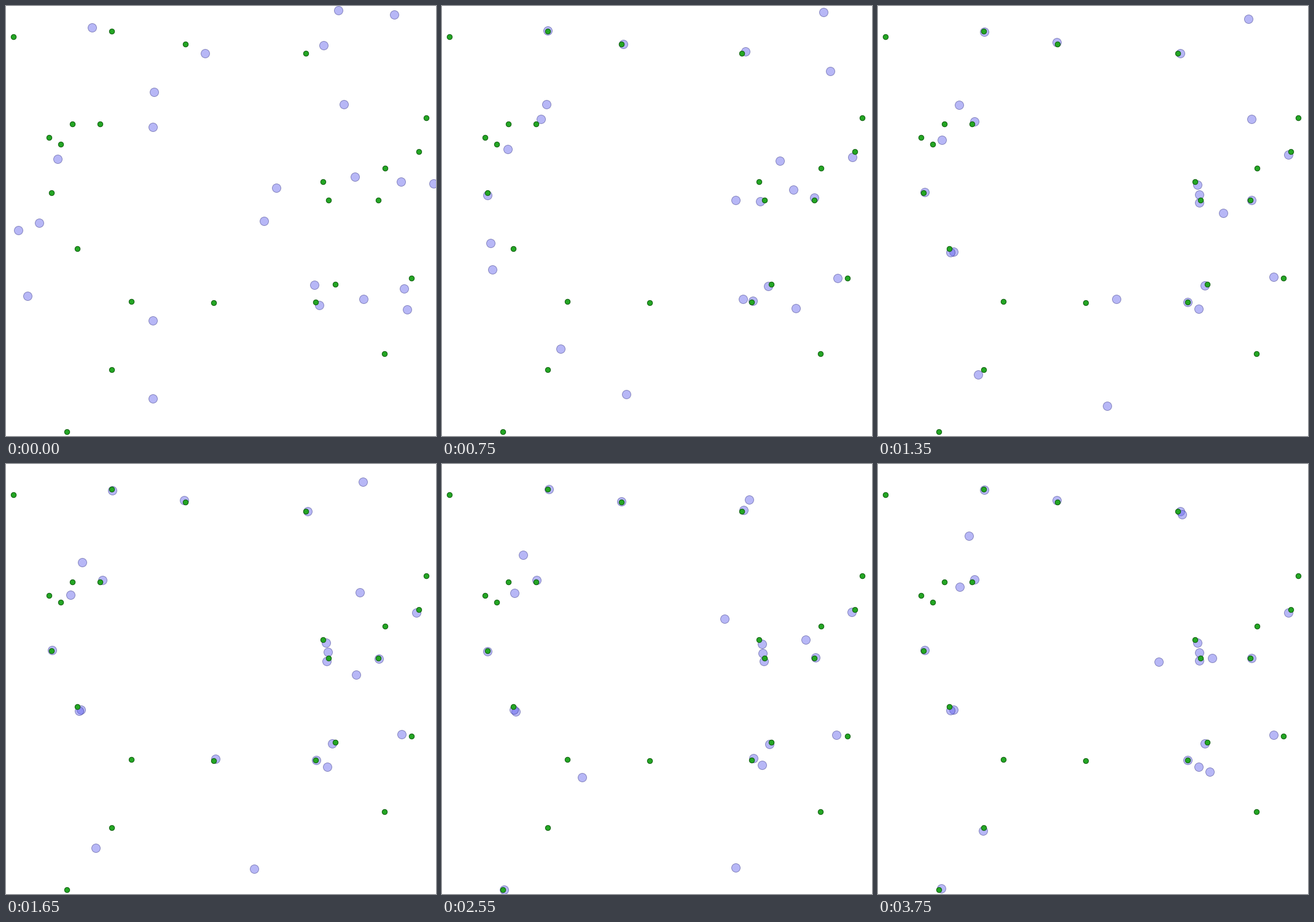
These frames come from a looping animation (700x700 px, 3900 ms). A matplotlib script:

```python
import numpy as np
import matplotlib.pyplot as plt
from matplotlib.animation import FuncAnimation

SIZE, DPI = 700, 100
FRAMES, INTERVAL = 26, 150
PX = 72 / DPI  # points per pixel

SITES = [(12, 50.5), (172, 41), (292.5, 62), (488.5, 77.5), (108, 192), (153, 192),
         (70, 214), (89, 225), (74, 304.5), (116, 395.5), (204, 481.5), (338.5, 483.5),
         (504, 482.5), (536, 453.5), (660.5, 443.5), (616, 566), (172, 592.5),
         (99, 693.5), (516, 286), (525, 316.5), (606, 316), (617.5, 264.5),
         (672, 237.5), (684, 182)]

# Agents that glide to a resting place: (start, home), grouped by travel time.
FAST, SLOW = 6, 9
NEAR = [((140, 35), (174, 42)), ((324, 77), (292, 60.5)), ((241, 140), (156, 189)),
        ((54, 353.5), (75.5, 304.5)), ((517.5, 64), (492, 76.5)),
        ((568, 278), (608.5, 316)), ((696, 289), (668, 242)),
        ((440, 296), (524, 321)), ((502.5, 454.5), (533, 456)),
        ((510.5, 487), (506, 481)), ((648.5, 460), (643.5, 441.5))]
FAR = [((20, 365), (122, 402)), ((35, 472), (118, 401)), ((643.5, 286), (523, 308)),
       ((420, 350), (521, 292.5)), ((653.5, 494), (522, 492))]

# Agents that keep roaming: one point per key time, in frames.
KEYS = np.array([0, 5, 9, 17, 25])
ROAM = np.array([
    [(239, 197.5), (170, 160), (132, 161.5), (132, 148), (148, 117.5)],
    [(84, 249), (107, 233.5), (104, 218), (118, 210), (133, 200.5)],
    [(239, 512), (193, 558), (163.5, 600.5), (101, 693), (103, 691.5)],
    [(239, 639.5), (300, 632.5), (373, 651), (478, 657), (540.5, 501)],
    [(541.5, 7), (621.5, 10), (603.5, 21.5), (500, 58), (495.5, 82)],
    [(632, 14.5), (632, 106), (608, 184), (460, 252), (457.5, 322.5)],
    [(550, 160), (550.5, 252), (562, 337), (592.5, 286), (544.5, 316)],
    [(582, 477), (490, 477), (388.5, 477), (228, 510), (171.5, 597)],
])
SLOPES = np.gradient(ROAM, KEYS, axis=1)

starts, homes = np.array(NEAR + FAR, float).transpose(1, 0, 2)
travel = np.repeat([FAST, SLOW], [len(NEAR), len(FAR)])[:, None]
phase = np.random.default_rng(4).uniform(0, 2 * np.pi, homes.shape)


def settle(frame):
    """Ease from start to home, then hover there slightly."""
    u = np.clip(frame / travel, 0, 1)
    ease = u * u * (3 - 2 * u)
    hover = 1.2 * np.sin(0.4 * frame + phase)
    return starts + (homes + hover - starts) * ease


def roam(frame):
    """Cubic Hermite blend between the two key points around a frame."""
    k = min(np.searchsorted(KEYS, frame, side="right") - 1, len(KEYS) - 2)
    span = KEYS[k + 1] - KEYS[k]
    t = (frame - KEYS[k]) / span
    p, q = ROAM[:, k], ROAM[:, k + 1]
    u, v = SLOPES[:, k] * span, SLOPES[:, k + 1] * span
    return ((2 * t**3 - 3 * t**2 + 1) * p + (t**3 - 2 * t**2 + t) * u
            + (3 * t**2 - 2 * t**3) * q + (t**3 - t**2) * v)


def positions(frame):
    return np.vstack([settle(frame), roam(frame)])


def dots(points, diameter, face, edge, z):
    x, y = np.transpose(points)
    return ax.scatter(x, y, s=(diameter * PX) ** 2, c=[face], edgecolors=[edge],
                      linewidths=PX, zorder=z, snap=False)


fig = plt.figure(figsize=(SIZE / DPI, SIZE / DPI), dpi=DPI, facecolor="white")
ax = fig.add_axes([0, 0, 1, 1])
ax.axis("off")
ax.set_xlim(0.5, SIZE + 0.5)
ax.set_ylim(SIZE + 0.5, 0.5)

agents = dots(positions(0), 14, (0.38, 0.38, 0.93, 0.45), (0.1, 0.1, 0.45, 0.42), 1)
dots(SITES, 8.4, (0.14, 0.65, 0.14), (0.05, 0.36, 0.05), 2)


def draw(frame):
    agents.set_offsets(positions(frame))
    return [agents]


anim = FuncAnimation(fig, draw, frames=FRAMES, interval=INTERVAL,
                     init_func=lambda: draw(0), repeat=True, repeat_delay=0)
plt.show()
```
